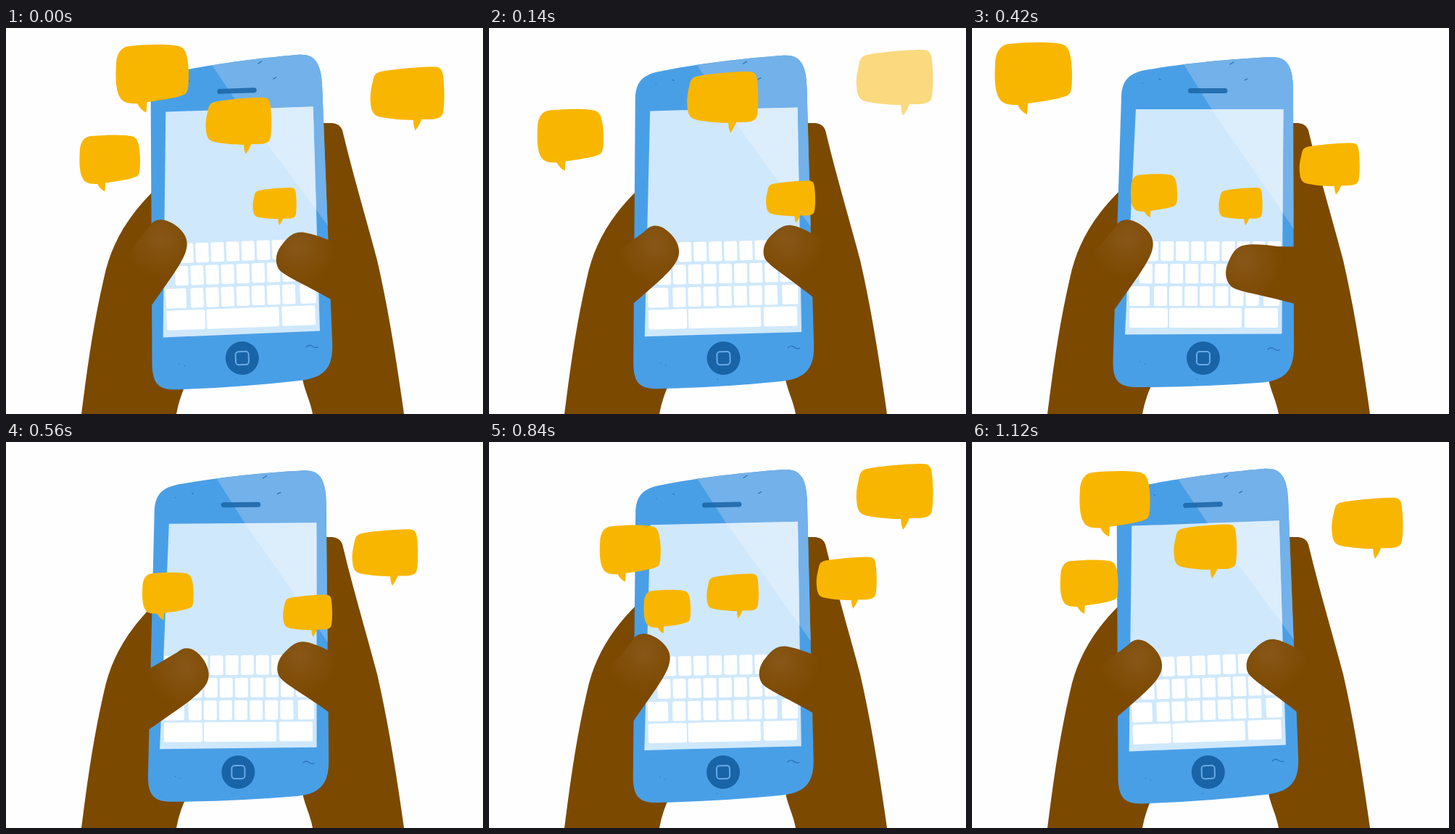
These frames come from a looping animation (658 px wide and 532 px high, 1.19 s). An HTML page:

```html
<!DOCTYPE html>
<html lang="en">
<head>
<meta charset="utf-8">
<title>Texting</title>
<style>
  html, body { margin: 0; width: 100%; height: 100%; overflow: hidden; background: #fefefe; }
  svg { display: block; width: 658px; height: 532px; }
  .skin { fill: #7c4900; }
  .body { fill: #499fe6; }
  .screen { fill: #cfe8fc; }
  .key { fill: #fff; }
  .dark { fill: #1964a6; }
  .speck { fill: none; stroke: #2c74b8; stroke-width: 1.3; stroke-linecap: round; }
  .bubble { fill: #f9b600; }
</style>
</head>
<body>
<svg viewBox="0 0 658 532" xmlns="http://www.w3.org/2000/svg">
  <defs>
    <path id="shell" d="M206 95C207 72 216 61 245 57C285 50 350 43 412 40C434 39 443 52 443 85L444 440C444 474 430 487 395 489Q315 495 235 495C204 496 194.500 489 194.500 460Z"/>
    <path id="glass" d="M226 112H429.500L427.500 421.500L211 422.500Z"/>
    <clipPath id="inShell"><use href="#shell"/></clipPath>
    <clipPath id="inGlass"><use href="#glass"/></clipPath>
    <radialGradient id="leftGlow" gradientUnits="userSpaceOnUse" cx="214" cy="291" r="54">
      <stop offset="0" stop-color="#885718"/><stop offset="1" stop-color="#7c4900"/>
    </radialGradient>
    <radialGradient id="rightGlow" gradientUnits="userSpaceOnUse" cx="402" cy="302" r="54">
      <stop offset="0" stop-color="#885718"/><stop offset="1" stop-color="#7c4900"/>
    </radialGradient>
    <path id="leftBubble" d="M1 30C1 14 8 3 20 2C50 -1 85 -1 95 3C103 6 106 18 107 40C107 55 107 64 104 70C100 76 75 80 46 84L45 99Q37 96 32 86C20 86 10 85 6 76C0 66 0 45 1 30Z"/>
    <path id="rightBubble" d="M4 22C6 10 9 8 20 6C45 2 75 0 92 0C101 0 104 4 105 14C107 32 107 52 105 64C104 71 100 74 88 75L74 75Q70 85 65 91Q62 84 62 76C45 76 28 74 17 72C6 70 2 66 1 50C0 40 2 30 4 22Z"/>
  </defs>

  <g class="skin">
    <path d="M104 532C112 470 120 410 135 345C144 302 164 264 202 226H260V470L245 498Q238 515 235 532Z"/>
    <path d="M430 131H450Q461 132 464 141C478 200 496 260 512 320C527 385 539 460 549 532H423C420 515 412 500 409 484L400 300Z"/>
  </g>

  <g id="phone">
    <use href="#shell" class="body"/>
    <path clip-path="url(#inShell)" fill="#72b1e9" d="M289 45L330 111L446 280V30H289Z"/>
    <use href="#glass" class="screen"/>
    <path clip-path="url(#inGlass)" fill="#dcedfc" d="M330 111L446 280V100H330Z"/>
    <g id="keys" class="key"></g>
    <rect class="dark" opacity=".85" x="298" y="83" width="54.500" height="7" rx="3.500"/>
    <circle class="dark" cx="319" cy="455" r="23"/>
    <rect x="310" y="446" width="18" height="18" rx="4" fill="none" stroke="#68a9e6" stroke-width="2"/>
    <path class="speck" d="M408 443q4 -4 8 -1t8 2M376 72l4 -2M232 460h.1M239 463h.1M310 484h.1M235 76h.1M258 70l2 1M356 50l5 -3"/>
  </g>

  <path id="leftThumb" fill="url(#leftGlow)" d="M164 315L197 275C203 263 216 260 234 272C250 284 252 296 248 308C243 324 225 348 201 382L188 400H160Z"/>
  <path id="rightThumb" fill="url(#rightGlow)" d="M490 306L452 295C440 290 425 284 412 282C400 280 392 284 382 297C372 308 370 322 376 332C382 341 410 352 448 374L478 391L500 340Z"/>
  <g id="bubbles" class="bubble"></g>
</svg>
<script>
const NS = "http://www.w3.org/2000/svg";
const STEP = 70, COUNT = 17, TAP = 6, RISE = 12;
const $ = id => document.getElementById(id);

function add(parent, tag, attrs) {
  const el = document.createElementNS(NS, tag);
  for (const name in attrs) el.setAttribute(name, attrs[name]);
  return parent.appendChild(el);
}

// keyboard
const key = (x, y, width = 18) => add($("keys"), "rect", { x, y, width, height: 27, rx: 2.5 });
const row = (x, y, n) => { for (let i = 0; i < n; i++) key(x + i * 21.1, y); };
row(218, 294, 10);
row(231, 325, 9);
row(251, 356, 7);
key(217, 356, 28);
key(402, 356, 22);
key(217, 386, 53);
key(272, 386, 100);
key(376, 386, 46);

// each bubble rises along a cubic curve given by its four control points
const rightCurve = [[340, 220], [427, 214], [494, 125], [506, 30]];
const middleCurve = [[326, 226], [286, 172], [265, 94], [275, 25]];
const nearLeftCurve = [[238, 208], [156, 188], [136, 89], [151, 23]];
const farLeftCurve = [[237, 209], [143, 192], [37, 125], [31, 20]];

const bubbles = [
  { shape: "rightBubble", curve: rightCurve, start: 0, width: 107 },
  { shape: "rightBubble", curve: rightCurve, start: 6, width: 107 },
  { shape: "rightBubble", curve: middleCurve, start: 9, width: 107 },
  { shape: "leftBubble", curve: nearLeftCurve, start: 5, width: 101 },
  { shape: "leftBubble", curve: farLeftCurve, start: 11, width: 107 }
];
for (const b of bubbles) b.el = add($("bubbles"), "use", { href: "#" + b.shape });

function pointOn([a, b, c, d], u) {
  const v = 1 - u;
  return [0, 1].map(i => v * v * v * a[i] + 3 * v * v * u * b[i] + 3 * v * u * u * c[i] + u * u * u * d[i]);
}

function drawBubble(b, step) {
  const age = (step - b.start + COUNT) % COUNT;
  const u = Math.min(age / RISE, 1);
  const [x, y] = pointOn(b.curve, u);
  const scale = (61 + (b.width - 61) * u) / 107;
  b.el.setAttribute("transform", `translate(${x} ${y}) scale(${scale})`);
  b.el.setAttribute("opacity", Math.max(0, Math.min(1, (RISE + 2 - age) / 2)));
}

function pose(el, angle, dx, dy, px, py) {
  el.setAttribute("transform", `translate(${dx} ${dy}) rotate(${angle} ${px} ${py})`);
}

function draw(step) {
  // the phone rocks upright by the second tap, then leans back
  const lean = step < TAP ? 1 - step / TAP : (step - TAP) / 10;
  pose($("phone"), -2.1 * lean, 0, 0, 322, 270);

  // thumbs lift between taps; the left reaches over after its second, the right presses low on it
  const lift = Math.abs(Math.sin(Math.PI * step / TAP));
  const reach = step > TAP && step < 2 * TAP ? lift : 0;
  const press = Math.max(0, 1 - Math.abs(step - TAP) / 2.5);
  pose($("leftThumb"), 16 * lift + 7 * reach, 15 * reach, 8 * reach, 188, 354);
  pose($("rightThumb"), 10 * lift - 15 * press, 9 * lift - 25 * press, 22 * press - 14.5 * lift, 388, 308);

  for (const b of bubbles) drawBubble(b, step);
}

const began = performance.now();
function tick() {
  draw(Math.floor((performance.now() - began) / STEP) % COUNT);
  requestAnimationFrame(tick);
}
tick();
</script>
</body>
</html>
```
